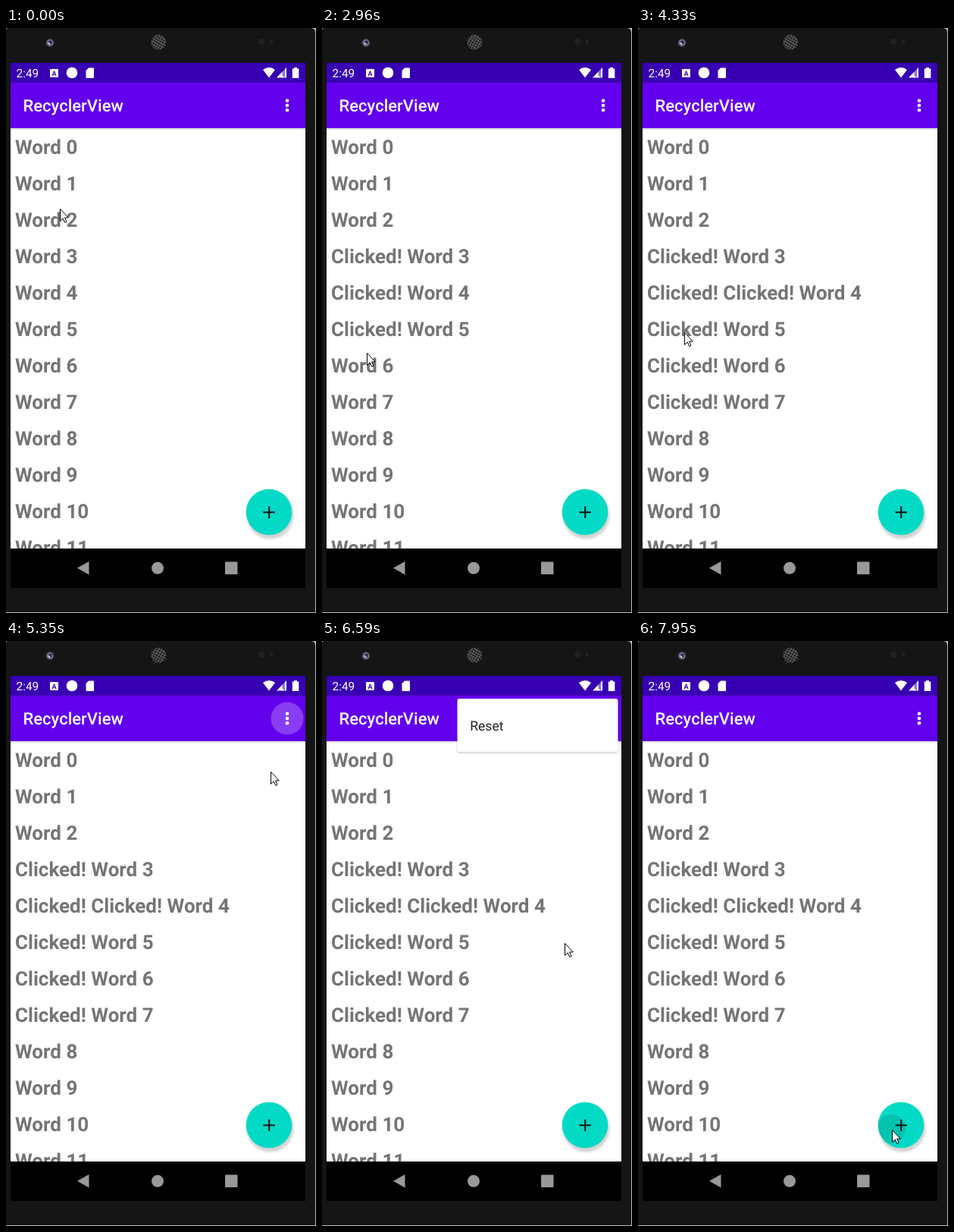
Animation of 409x771 px, one loop 8 s. Source, as an HTML page:

```html
<!DOCTYPE html>
<html lang="en">
<head>
<meta charset="utf-8">
<title>Word list</title>
<style>
  html, body { margin: 0; width: 100%; height: 100%; overflow: hidden; background: #bbb; }
  svg { display: block; width: 409px; height: 771px; font-family: Roboto, sans-serif; text-rendering: geometricPrecision; }
  #rows { font-size: 26px; font-weight: 700; fill: #757575; }
  #menu { transform-origin: 391px 76px; }
</style>
</head>
<body>
<svg viewBox="0 0 409 771">
  <defs>
    <pattern id="mesh" width="3.4" height="3.4" patternUnits="userSpaceOnUse" patternTransform="rotate(30)">
      <circle cx="1.7" cy="1.7" r="1.1" fill="#0c0c0c"/>
    </pattern>
    <linearGradient id="fall" x2="0" y2="1">
      <stop offset="0" stop-opacity=".18"/><stop offset="1" stop-opacity="0"/>
    </linearGradient>
    <filter id="soft" x="-20%" y="-30%" width="140%" height="170%"><feGaussianBlur stdDeviation="1.8"/></filter>
    <clipPath id="fabClip"><circle cx="347" cy="638" r="30.3"/></clipPath>
  </defs>

  <!-- phone body -->
  <path d="M0 770V3Q0 0 3 0H402Q408 0 408 6V770Z" fill="#151515"/>
  <circle cx="58" cy="19.5" r="6" fill="#2c2c32"/>
  <circle cx="58" cy="19.5" r="4.4" fill="#77798f"/>
  <circle cx="58.5" cy="19" r="2.4" fill="#2a2a50"/>
  <circle cx="57" cy="20.5" r="1.2" fill="#ccc"/>
  <circle cx="201.3" cy="18.7" r="10" fill="#555"/>
  <circle cx="201.3" cy="18.7" r="10" fill="url(#mesh)"/>
  <circle cx="337" cy="18" r="4" fill="#202020"/>
  <circle cx="350" cy="18" r="2.5" fill="#222"/>

  <!-- list -->
  <path d="M6 132H395V686H6Z" fill="#fff"/>
  <g id="rows"></g>
  <path d="M6 132H395V135H6Z" fill="url(#fall)"/>

  <!-- bars -->
  <path d="M6 46H395V71.5H6Z" fill="#3700b3"/>
  <path d="M6 71.5H395V132H6Z" fill="#6200ee"/>
  <path d="M6 686H395V738H6Z" fill="#000"/>
  <g fill="#fff">
    <text x="13.5" y="64.5" font-size="15.4">2:49</text>
    <rect x="58" y="54" width="11" height="11" rx="1.2"/>
    <text x="63.5" y="62.8" font-size="9" font-weight="700" text-anchor="middle" fill="#3700b3">A</text>
    <circle cx="87" cy="59" r="7.3"/>
    <path d="M109 52.5H115Q116 52.5 116 53.5V65Q116 66 115 66H106.5Q105.5 66 105.5 65V56Z"/>
    <path d="M339 55Q347 49 355 55L347 65.5Z"/>
    <path d="M370 52V65.5H357Z"/>
    <path d="M380 53.5V52H384V53.5H386.3V66H377.8V53.5Z"/>
    <text x="22.5" y="110.3" font-size="22" font-weight="500">RecyclerView</text>
    <circle id="press" cx="371" cy="102" r="21.5" fill-opacity=".24"/>
    <circle cx="371" cy="95.7" r="2.3"/>
    <circle cx="371" cy="102" r="2.3"/>
    <circle cx="371" cy="108.3" r="2.3"/>
  </g>
  <path d="M364.5 56V62.5L368 65.5V54Z" fill="#3700b3" opacity=".55"/>
  <g fill="#999">
    <path d="M94 711.8L109.5 703V720.6Z"/>
    <circle cx="200" cy="711.8" r="8"/>
    <rect x="289" y="703.5" width="16.5" height="16.5" rx="1"/>
  </g>

  <!-- floating button -->
  <circle cx="348.5" cy="642.5" r="31" opacity=".17" filter="url(#soft)"/>
  <circle cx="347" cy="638" r="30.3" fill="#03dac5"/>
  <circle id="ripple" cx="334" cy="643" r="19" opacity=".11" clip-path="url(#fabClip)"/>
  <path d="M339.5 638.2H354.8M347.2 630.5V645.9" stroke="#111" stroke-width="2.1"/>

  <!-- overflow menu -->
  <g id="menu">
    <rect x="178.5" y="78" width="212" height="70" rx="3" opacity=".17" filter="url(#soft)"/>
    <rect x="178.5" y="76" width="212" height="70" rx="3" fill="#fff"/>
    <text x="195.2" y="117.8" font-size="17.6" fill="#212121">Reset</text>
  </g>

  <path id="cursor" d="M.5 .5V16.5L4.2 13L6.8 18.5L9 17.5L6.6 12H11.3Z" fill="#fff" stroke="#000"/>
</svg>
<script>
const LOOP = 8000, TICK = 140, LEAD = 35;
const $ = id => document.getElementById(id);
const clamp = v => Math.min(1, Math.max(0, v));
const smooth = v => v * v * (3 - 2 * v);

// Stops of the cursor tip: [tick, x, y]
const stops = [
  [1, 71, 238], [3, 55, 267], [13, 54, 304], [17, 57, 358], [21, 59, 428],
  [23, 60, 481], [26, 60, 481], [29, 60, 352], [31, 61, 401], [32, 182, 311],
  [35, 366, 102], [38, 349, 172], [47, 320, 398], [52, 335, 644]
];

// Rows tapped in turn, one every third tick
const taps = [3, 4, 5, 6, 7, 4];
const tapTick = i => 14 + 3 * i;

const rows = Array.from({ length: 12 }, (_, i) => {
  const row = document.createElementNS("http://www.w3.org/2000/svg", "text");
  row.setAttribute("x", 12);
  row.setAttribute("y", 166.3 + 48 * i);
  $("rows").append(row);
  return row;
});

function cursorAt(n) {
  const next = stops.findIndex(s => s[0] >= n);
  const i = next < 0 ? stops.length - 1 : Math.max(1, next);
  const [a, x, y] = stops[i - 1], [b, u, v] = stops[i];
  const k = smooth(clamp((n - a) / (b - a)));
  return [x + (u - x) * k, y + (v - y) * k].map(Math.round);
}

function draw(n) {
  rows.forEach((row, i) => {
    const count = taps.filter((r, j) => r === i && n >= tapTick(j)).length;
    row.textContent = "Clicked! ".repeat(count) + "Word " + i;
  });
  $("cursor").setAttribute("transform", `translate(${cursorAt(n)})`);

  const grow = clamp((n - 38) / 2);
  $("press").setAttribute("opacity", n < 40 ? clamp((n - 34) / 2) : 0);
  $("menu").style.opacity = grow * clamp((50 - n) / 2);
  $("menu").style.transform = `scale(${0.96 + 0.04 * grow})`;
  $("ripple").style.visibility = n >= 57 ? "visible" : "hidden";
}

// The screen refreshes once per tick
function frame() {
  draw(Math.floor((performance.now() % LOOP + LEAD) / TICK));
  requestAnimationFrame(frame);
}
frame();
</script>
</body>
</html>
```
